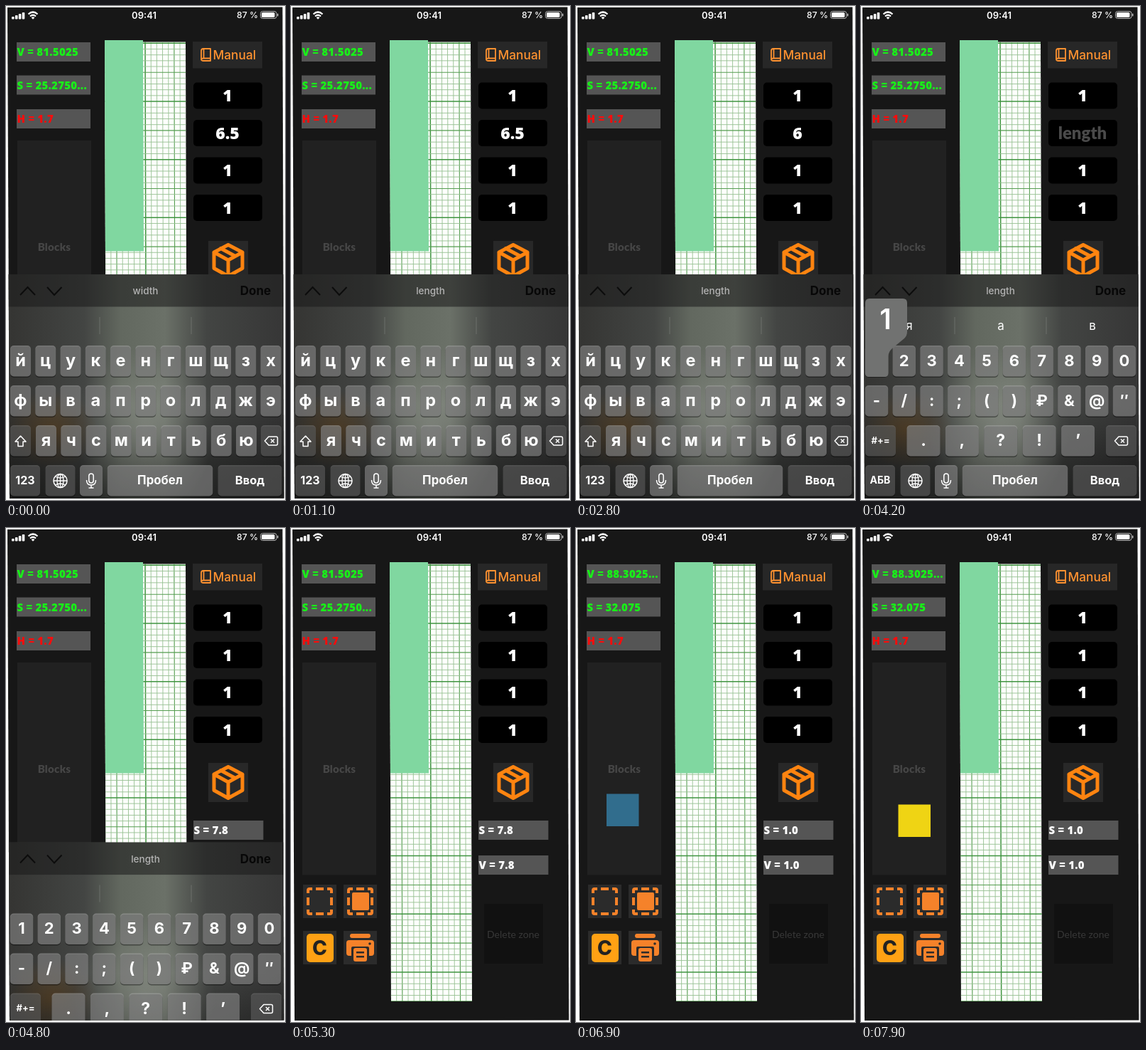
These frames come from a looping animation (393x694 px, 8000 ms). An HTML page:

```html
<!DOCTYPE html>
<html lang="en">
<head>
<meta charset="utf-8">
<title>Block calculator</title>
<style>
  html, body { margin: 0; width: 100%; height: 100%; overflow: hidden; background: #fff; }
  svg { display: block; width: 100vw; height: 100vh; }
  text { font-family: Inter, Roboto, sans-serif; white-space: pre; }
  .num { font-family: "Open Sans", "Noto Sans", sans-serif; font-weight: 800; }
  .geo { font-family: Lato, sans-serif; }
</style>
</head>
<body>
<svg id="stage" viewBox="0 0 393 694" preserveAspectRatio="none"></svg>
<script>
const LOOP = 8000;
const ORANGE = '#f5822a';

const rect = (x1, y1, x2, y2, fill, r = 0, extra = '') =>
  `<rect x="${x1}" y="${y1}" width="${x2 - x1}" height="${y2 - y1}" rx="${r}" fill="${fill}" ${extra}/>`;
const text = (x, y, size, fill, str, extra = '') =>
  `<text x="${x}" y="${y}" font-size="${size}" fill="${fill}" ${extra}>${str}</text>`;
const mid = (x, y, size, fill, str, extra = '') =>
  text(x, y, size, fill, str, 'text-anchor="middle" ' + extra);
const line = (d, color, width, extra = '') =>
  `<path d="${d}" fill="none" stroke="${color}" stroke-width="${width}" ${extra}/>`;
const group = (id, body) => `<g id="${id}">${body}</g>`;
const ROUND = 'stroke-linecap="round" stroke-linejoin="round"';

function statusBar() {
  const bars = [0, 1, 2, 3].map(i => rect(8 + i * 4.9, 15 - i * 2, 11.6 + i * 4.9, 18.5, '#fff', 1)).join('');
  const wifi = line('M31.5 11.5Q38 5.5 44.5 11.5M34 14.5Q38 11 42 14.5', '#fff', 2.2)
    + '<path d="M35.6 16.3Q38 14.3 40.4 16.3L38 18.8Z" fill="#fff"/>';
  return bars + wifi
    + mid(194.5, 17.5, 13, '#fff', '09:41', 'font-weight="600"')
    + text(325, 17, 12.2, '#fff', '87 %', 'font-weight="500"')
    + rect(358.5, 7.5, 381, 17.5, 'none', 3, 'stroke="#bbb"')
    + rect(360, 9, 378.5, 16, '#fff', 1.5) + rect(382, 10.5, 383.5, 14.5, '#bbb', 1);
}

function graphPaper() {
  const step = 8.165;
  const style = i => i % 10 === 0 ? ['#3f9440', 1.5] : i % 5 === 0 ? ['#559d50', 1.1] : ['#97c092', 0.9];
  let lines = '';
  for (let i = -7; i <= 6; i++) {
    const x = 196 + i * step;
    lines += line(`M${x} 49L${x + 1.7} 665`, ...style(i));
  }
  for (let i = -10; i <= 65; i++) {
    const y = 134 + i * step;
    lines += line(`M139 ${y}H255`, ...style(i));
  }
  return `<g clip-path="url(#paperClip)">${rect(138, 48, 256, 666, '#fdfffc')}${lines}</g>
    <path d="M139 48H193L194 344.5H140Z" fill="#80d7a0"/>`;
}

function iconButtons() {
  const tile = (x, y) => rect(x, y, x + 47, y + 47, '#2b2b2b');
  const dashed = x => line(`M${x} 513V509Q${x} 507 ${x + 2} 507H${x + 6}M${x + 11} 507H${x + 22}`
    + `M${x + 27} 507H${x + 31}Q${x + 33} 507 ${x + 33} 509V513M${x + 33} 519V530`
    + `M${x + 33} 536V540Q${x + 33} 542 ${x + 31} 542H${x + 27}M${x + 22} 542H${x + 11}`
    + `M${x + 6} 542H${x + 2}Q${x} 542 ${x} 540V536M${x} 530V519`, ORANGE, 4);
  return tile(17, 501) + tile(74, 501) + tile(17, 566) + tile(74, 566)
    + dashed(24) + dashed(81) + rect(86, 512, 110, 537, ORANGE, 2)
    + rect(22, 570, 60, 610, '#ffa114', 5)
    + mid(40.5, 600, 28, '#222', 'C', 'font-weight="800"')
    + rect(83, 570, 112, 576, ORANGE, 3) + rect(78, 579, 117, 601, ORANGE, 4)
    + rect(85, 588, 110, 611, '#2b2b2b', 2) + rect(88, 590, 107, 609, ORANGE, 3)
    + rect(92, 595, 103, 597.5, '#2b2b2b') + rect(92, 601, 103, 603.5, '#2b2b2b')
    + '<circle cx="111" cy="584" r="1.8" fill="#2b2b2b"/>';
}

function mainScreen() {
  const label = (id, x, y, color, str = '') => rect(x, y, x + (x > 200 ? 98.5 : 104), y + 27, '#555')
    + text(x + 0.5, y + 19.2, 15, color, str, `id="${id}" class="num" letter-spacing=".25"`);
  const field = i => rect(264, 107.5 + i * 52.5, 361, 144.5 + i * 52.5, '#000', 5)
    + mid(312, 134 + i * 52.5, 23, '#fff', '1', `id="field${i}" class="num"`);
  return statusBar()
    + label('volume', 15, 51, '#18f018') + label('area', 15, 97.5, '#18f018')
    + label('height', 15, 145, '#fa0c0c', 'H = 1.7')
    + rect(16, 189, 120, 487.5, '#212121')
    + mid(68, 344, 15, '#464646', 'Blocks', 'class="geo" font-weight="900" letter-spacing=".3"')
    + graphPaper()
    + rect(263, 50, 361, 87.5, '#272727')
    + line('M288 73.5V60H278Q275 60 275 63V74.5Q275 77 278 77H288V73.5H278Q275 73.5 275 75.5M278.5 60V73.5', '#ff9230', 1.8, ROUND)
    + text(291.5, 75, 17.3, '#ff9230', 'Manual', 'font-weight="500"')
    + [0, 1, 2, 3].map(field).join('')
    + mid(312, 187, 24, '#4a4a4a', 'length', 'id="hint" class="geo" font-weight="900"')
    + rect(285, 330, 341, 385, '#282828')
    + line('M313 335.5L333 346V368.5L313 379.5L293 368.5V346ZM293 346L313 357L333 346M313 357V379M302.500 340.5L323 351.5', '#ff8410', 5, ROUND)
    + label('resultS', 264, 411, '#fff') + label('resultV', 264, 460, '#fff')
    + rect(272, 528, 355, 612, '#111')
    + mid(313, 576, 14, '#383838', 'Delete zone', 'class="geo"')
    + iconButtons()
    + rect(0, 0, 45.5, 45.5, '#316d8d', 0, 'id="block"');
}

function callout() {
  return rect(198.5, 107, 379, 146, '#303031', 8)
    + '<path d="M320 145.5L331 155.5L342 145.5Z" fill="#303031"/>'
    + line('M277.5 107V146', '#4b4b4b', 1)
    + mid(238, 132, 14.7, '#fff', 'Select', 'font-weight="500"')
    + mid(328, 132, 14.4, '#fff', 'Select All', 'font-weight="500"');
}

const LIGHT = 'rgba(255,255,255,.26)', DIM = 'rgba(255,255,255,.13)';
const WHITE = '#fff';

function key(cx, row, width, label = '', size = 23.5, fill = LIGHT, extra = '') {
  const y = 477 + row * 56;
  const left = cx - width / 2, right = cx + width / 2;
  return rect(left, y + 1.5, right, y + 45, 'rgba(0,0,0,.4)', 5)
    + rect(left, y, right, y + 43.5, '#555', 5, 'opacity=".35"')
    + rect(left, y, right, y + 43.5, fill, 5, extra)
    + (label && mid(cx, y + 21 + size * 0.36, size, WHITE, label, 'font-weight="650"'));
}

const row = (chars, index, start, pitch, width, size) =>
  [...chars].map((c, i) => key(start + i * pitch, index, width, c.replace('&', '&amp;'), size)).join('');

function letterKeys() {
  return row('йцукенгшщзх', 0, 20.5, 35.25, 29) + row('фывапролджэ', 1, 20.5, 35.25, 29)
    + row('ячсмитьбю', 2, 56.5, 35.25, 29)
    + key(20.5, 2, 29, '', 0, DIM) + key(373.5, 2, 29, '', 0, DIM, 'id="eraseKey"')
    + line('M20.5 604L28 612H24V618.5H17V612H13Z', WHITE, 1.5, 'stroke-linejoin="round"')
    + key(27, 3, 42, '123', 16, DIM);
}

function numberKeys() {
  return row('1234567890', 0, 22, 38.78, 32.5, 22) + row('-/:;()₽&@″', 1, 22, 38.78, 32.5, 22)
    + row('.,?!’', 2, 88, 54.4, 47, 23)
    + key(27.5, 2, 43, '#+=', 13, DIM) + key(366.5, 2, 43, '', 0, DIM)
    + key(27, 3, 42, 'АБВ', 14, DIM);
}

function backspace(id, cx) {
  const shape = `M${cx - 9} 611L${cx - 3.5} 605H${cx + 7}Q${cx + 9} 605 ${cx + 9} 607V615Q${cx + 9} 617 ${cx + 7} 617H${cx - 3.5}Z`;
  const cross = `M${cx - 0.5} 608.5L${cx + 4.5} 613.5M${cx + 4.5} 608.5L${cx - 0.5} 613.5`;
  return `<path id="${id}" d="${shape}" fill="none" stroke="#fff" stroke-width="1.5" stroke-linejoin="round"/>`
    + line(cross, WHITE, 1.5, `id="${id}X"`);
}

function keyboard() {
  const chevron = 'fill="none" stroke="#0c0c0c" stroke-width="2"';
  const globe = '<circle cx="76.5" cy="667" r="9.5" fill="none" stroke="#fff" stroke-width="1.5"/>'
    + line('M67 667H86M76.5 657.5V676.5M69.5 661Q76.5 665 83.5 661M69.5 673Q76.5 669 83.5 673', WHITE, 1.3)
    + '<ellipse cx="76.5" cy="667" rx="4.5" ry="9.5" fill="none" stroke="#fff" stroke-width="1.3"/>';
  const mic = rect(116.8, 657, 123.2, 670, 'none', 3.2, 'stroke="#fff" stroke-width="1.5"')
    + line('M113.5 666Q113.5 673 120 673T126.5 666M120 673V677M116.5 677H123.5', WHITE, 1.5);
  return rect(0, 377, 393, 694, 'url(#glow)')
    + rect(0, 540, 130, 650, 'url(#warm)') + rect(0, 560, 393, 694, 'url(#shade)')
    + rect(95, 480, 295, 710, 'url(#bright)')
    + rect(0, 377, 393, 422.5, 'rgba(26,26,26,.55)')
    + `<path d="M20 406L30.5 395L41 406M58 395L68 406L78.5 395" ${chevron}/>`
    + mid(196.5, 405, 13.5, '#b4b4b4', '', 'id="title" font-weight="500"')
    + mid(351.5, 406, 17, '#070707', 'Done', 'font-weight="700"')
    + line('M132 437V461M261 437V461', 'rgba(255,255,255,.16)', 1)
    + group('suggestions', ['я', 'а', 'в'].map((c, i) => mid(68 + i * 129, 455, 17, WHITE, c)).join(''))
    + group('letters', letterKeys() + backspace('erase', 373.5))
    + group('numbers', numberKeys() + backspace('eraseNum', 366.5))
    + key(76.5, 3, 42, '', 0, DIM) + globe + key(120, 3, 32, '', 0, LIGHT) + mic
    + key(217, 3, 148.5, 'Пробел', 16.8) + key(343.5, 3, 90, 'Ввод', 16.5, DIM)
    + group('popup', `<path d="M12 411H59Q65 411 65 417V458Q65 463 61 467L44 481Q38.5 486 38.5 492V516Q38.5 521 33.5 521H11Q6 521 6 516V417Q6 411 12 411Z" fill="#717271"/>`
      + mid(34.5, 454, 39, WHITE, '1', 'font-weight="600"'));
}

const stage = document.getElementById('stage');
stage.innerHTML = `<defs>
  <clipPath id="screenClip"><path d="M2 2L389.5 1.5L391.5 691.5L5 692Z"/></clipPath>
  <clipPath id="paperClip"><path d="M139 50.5H253L255 665H141Z"/></clipPath>
  <linearGradient id="glow">
    <stop offset="0" stop-color="#343432"/><stop offset=".28" stop-color="#434543"/>
    <stop offset=".41" stop-color="#62685f"/><stop offset=".57" stop-color="#6b7168"/>
    <stop offset=".72" stop-color="#434543"/><stop offset="1" stop-color="#363636"/>
  </linearGradient>
  <radialGradient id="warm">
    <stop offset="0" stop-color="#7a4a10" stop-opacity=".4"/><stop offset="1" stop-color="#7a4a10" stop-opacity="0"/>
  </radialGradient>
  <radialGradient id="bright">
    <stop offset="0" stop-color="#e4e8df" stop-opacity=".24"/><stop offset="1" stop-color="#e4e8df" stop-opacity="0"/>
  </radialGradient>
  <linearGradient id="shade" x2="0" y2="1">
    <stop offset="0" stop-opacity="0"/><stop offset=".7" stop-opacity=".4"/><stop offset="1" stop-opacity=".5"/>
  </linearGradient>
</defs>
<g clip-path="url(#screenClip)">${rect(0, 0, 393, 694, '#171717')}${mainScreen()}
${group('callout', callout())}${group('keyboard', keyboard())}</g>`;

const el = Object.fromEntries([...stage.querySelectorAll('[id]')].map(node => [node.id, node]));
const between = (t, a, b) => t >= a && t < b;
const progress = (t, a, b) => Math.min(1, Math.max(0, (t - a) / (b - a)));
const ease = p => p * p * (3 - 2 * p);
const show = (node, on) => node.setAttribute('display', on ? 'inline' : 'none');
const write = (node, str) => { if (node.textContent !== str) node.textContent = str; };

function render(t) {
  const numeric = t >= 3500;
  const added = t >= 6200;

  write(el.title, t < 1000 ? 'width' : 'length');
  write(el.field1, t < 1800 ? '6.5' : t < 2300 ? '6.' : t < 3000 ? '6' : t < 4300 ? '' : '1');
  show(el.hint, between(t, 3000, 4300));
  show(el.callout, between(t, 1300, 2100));
  show(el.letters, !numeric);
  show(el.numbers, numeric);
  show(el.suggestions, between(t, 3500, 4300));
  show(el.popup, between(t, 4100, 4300));

  const erasing = between(t, 1800, 2000) || between(t, 2300, 2450) || between(t, 2950, 3100);
  el.erase.setAttribute('fill', erasing ? '#fff' : 'none');
  el.eraseX.setAttribute('stroke', erasing ? '#444' : '#fff');
  el.eraseKey.setAttribute('fill', erasing ? LIGHT : DIM);

  const slide = ease(progress(t, 4700, 5050)) * 320;
  el.keyboard.setAttribute('transform', `translate(0 ${slide})`);
  show(el.keyboard, slide < 320);

  write(el.volume, added ? 'V = 88.3025...' : 'V = 81.5025');
  write(el.area, added ? 'S = 32.075' : 'S = 25.2750...');
  write(el.resultS, added ? 'S = 1.0' : 'S = 7.8');
  write(el.resultV, added ? 'V = 1.0' : 'V = 7.8');

  const drag = ease(progress(t, 7000, 7500));
  el.block.setAttribute('transform', `translate(${43 + 9.5 * drag} ${373.5 + 15 * drag})`);
  el.block.setAttribute('opacity', progress(t, 6200, 6600));
  el.block.setAttribute('fill', t < 7200 ? '#316d8d' : '#efd414');
}

const start = performance.now();
function tick() {
  render((performance.now() - start) % LOOP);
  requestAnimationFrame(tick);
}
tick();
</script>
</body>
</html>
```
